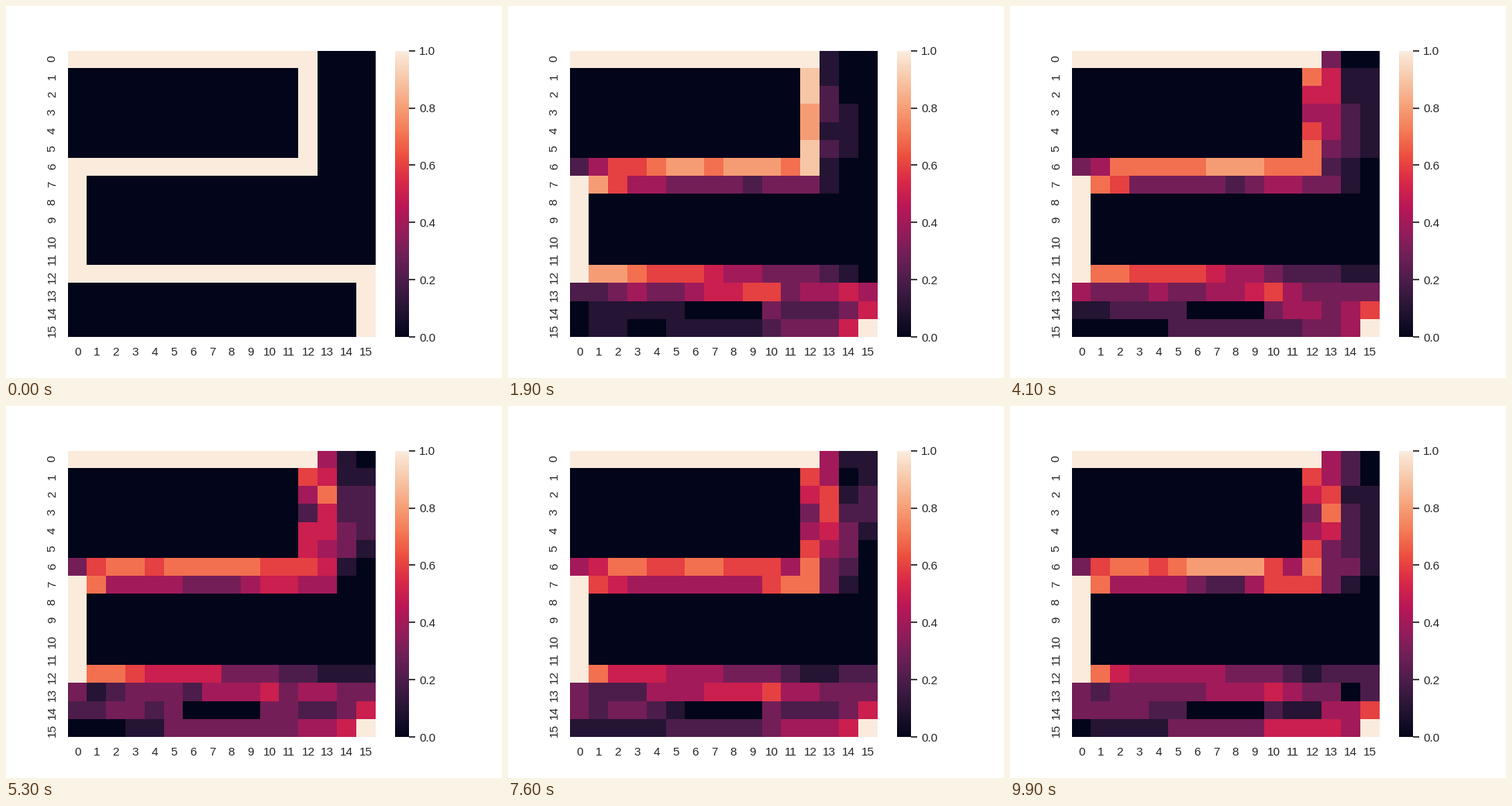
Animation, 640 px wide and 480 px high, one loop 10 s. Source, as a matplotlib script:

```python
import numpy as np
import matplotlib.pyplot as plt
from matplotlib.animation import FuncAnimation
from matplotlib.colors import LinearSegmentedColormap

FRAMES, WALKERS, SETTLED = 100, 10, 11
STEPS = np.arange(FRAMES)[:, None]
rng = np.random.default_rng(7)


def ripple(n):
    """Noise that drifts slowly in time and is shared by neighbours."""
    w = rng.normal(size=(FRAMES, n + 2))
    for i in range(1, FRAMES):
        w[i] = 0.95 * w[i - 1] + 0.31 * w[i]
    return (w[:, :-2] + 2 * w[:, 1:-1] + w[:, 2:]) / 3


def lane(at, early, late, span):
    """Walkers in this lane or an earlier one, per step and cell edge.

    All start in the first lane, settle quickly into the early profile,
    then spread to the late one over span steps.
    """
    x = np.arange(at[0], at[-1] + 1)
    a, b = np.interp(x, at, early), np.interp(x, at, late)
    blend = np.clip((STEPS - SETTLED) / span, 0, 1)
    onset = 1 - np.exp(-STEPS / 4)
    mean = WALKERS + (a + (b - a) * blend - WALKERS) * onset
    spread = np.sqrt(mean * (WALKERS - mean)) / 5
    return np.rint(np.clip(mean + spread * ripple(len(x)), 0, WALKERS))


def lanes(at, span, profiles):
    return np.stack([lane(at, a, b, span) for a, b in profiles], axis=2)


right = lanes([0, 3, 6], 40, [
    ([10, 10, 10], [6.5, 3, 7]),
    ([10, 10, 10], [9, 7, 9]),
    ([10, 10, 10], [9.5, 8.5, 9.5]),
])
middle = lane([1, 3, 8, 12], [2, 6, 8, 8], [4, 7, 6, 4], 75)
bottom = lanes([0, 9, 10, 14], 75, [
    ([8, 4, 3, 1], [5, 3, 2.5, 1.5]),
    ([10, 8.5, 7, 2.5], [7, 8, 5, 2.5]),
    ([10, 8.5, 8.5, 3.5], [9.5, 8, 7, 6]),
])
# A wall in row 14 keeps walkers from changing lanes there.
bottom[:, 5:10, 1:] = bottom[:, 7:8, 1:2]


def cover(flow):
    """Walkers touching each cell between successive edges."""
    n = len(flow)
    flow = np.column_stack([np.zeros(n), flow, np.full(n, WALKERS)])
    flow = np.minimum.accumulate(flow[:, ::-1], axis=1)[:, ::-1]
    a, b = flow[:-1], flow[1:]
    return np.maximum(a, b)[:, 1:] - np.minimum(a, b)[:, :-1]


def heat(i):
    grid = np.zeros((16, 16))
    grid[0, :13] = grid[7:13, 0] = WALKERS

    mid = middle[i]
    grid[6:8, :12] = cover(np.r_[0, mid][:, None]).T

    # Column 0 of this flow counts walkers that already turned left.
    flow = np.full((9, 4), WALKERS)
    flow[1:8, 1:] = right[i]
    flow[:7, 0], flow[7, 0] = 0, mid[-1]
    flow[7] = np.maximum(flow[7], mid[-1])
    grid[:8, 12:] = cover(flow)[:, 1:]

    low = np.vstack([np.full(3, WALKERS), bottom[i], np.zeros(3)])
    grid[12:] = cover(low).T
    return grid / WALKERS


def rocket():
    colors = ("#03051a #221331 #451c47 #691f55 #921c5b #b91657 #d92847 "
              "#ed503e #f47d57 #f6a47c #f7c9aa #faebdd").split()
    return LinearSegmentedColormap.from_list("rocket", colors, N=256)


plt.rcParams.update({
    "font.family": "Liberation Sans", "font.size": 11,
    "xtick.labelsize": 11, "ytick.labelsize": 11,
    "xtick.color": ".15", "ytick.color": ".15",
    "xtick.major.size": 6, "ytick.major.size": 6,
    "xtick.major.width": 1.25, "ytick.major.width": 1.25,
    "pcolormesh.snap": False,
})

fig, ax = plt.subplots(figsize=(6.4, 4.8), dpi=100)
mesh = ax.pcolormesh(heat(0), cmap=rocket(), vmin=0, vmax=1, linewidth=0)
ax.set(xlim=(0, 16), ylim=(16, 0))
bar = fig.colorbar(mesh, ax=ax)
bar.outline.set_linewidth(0)
ax.spines[:].set_visible(False)
ax.tick_params(bottom=False, left=False)
centers = np.arange(16) + 0.5
ax.set_xticks(centers, range(16))
ax.set_yticks(centers, range(16), rotation="vertical")


def draw(i):
    mesh.set_array(heat(i))
    return mesh,


anim = FuncAnimation(fig, draw, frames=FRAMES, interval=100, repeat=True,
                     repeat_delay=0, blit=False)
plt.show()
```
